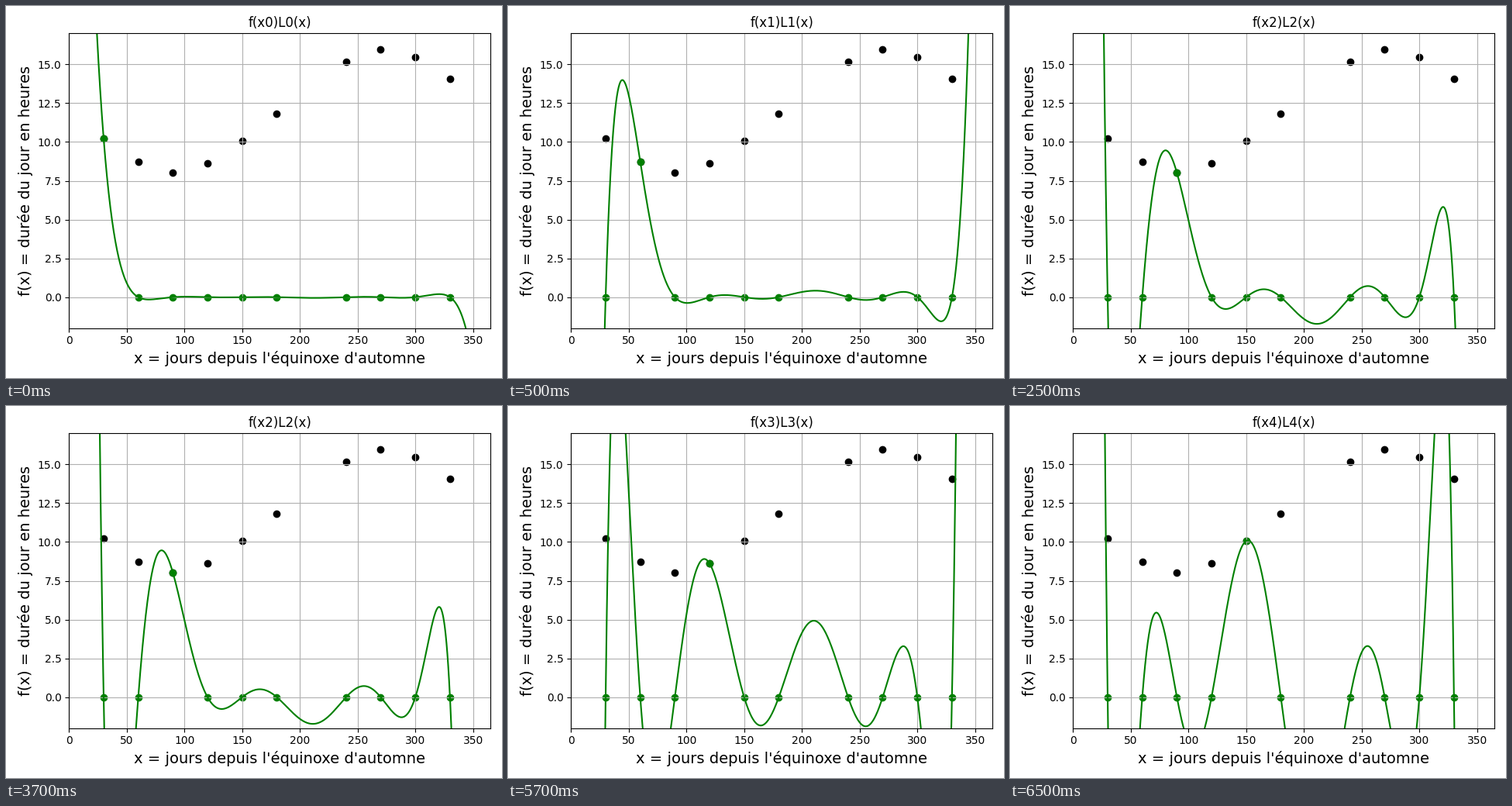
Write a matplotlib script that moves like this. It is 640 px wide and 480 px high and loops after 8000 ms.

```python
import numpy as np
import matplotlib.pyplot as plt
from matplotlib.animation import FuncAnimation

WIDTH, HEIGHT = 640, 480
STEP_MS = 500
STEPS = 16

days = np.array([30, 60, 90, 120, 150, 180, 240, 270, 300, 330])
hours = np.array([10.22, 8.73, 8.02, 8.62, 10.07, 11.82, 15.15, 15.95, 15.45, 14.07])
x = np.linspace(0, 365, 1000)


def basis(i, t):
    """Lagrange basis polynomial: 1 at node i, 0 at every other node."""
    others = np.delete(days, i)
    return np.prod((t[:, None] - others) / (days[i] - others), axis=1)


plt.rcParams["font.family"] = "DejaVu Sans"
fig, ax = plt.subplots(figsize=(WIDTH / 100, HEIGHT / 100), dpi=100)
ax.set(xlim=(0, 365), ylim=(-2, 17))
ax.set_xlabel("x = jours depuis l'équinoxe d'automne", fontsize=14)
ax.set_ylabel("f(x) = durée du jour en heures", fontsize=14)
title = ax.set_title("f(x0)L0(x)")
ax.grid(True)

ax.scatter(days, hours, color="black")
nodes = ax.scatter(days, 0 * hours, color="green")
curve, = ax.plot([], [], color="green")
fig.tight_layout()
fig.subplots_adjust(left=81.28 / WIDTH, top=444.67 / HEIGHT)


def update(step):
    # The first term is held for one step, each later one for four.
    i = (step + 3) // 4
    title.set_text(f"f(x{i})L{i}(x)")
    curve.set_data(x, hours[i] * basis(i, x))
    nodes.set_offsets(np.column_stack([days, hours * (np.arange(len(days)) == i)]))
    return title, curve, nodes


anim = FuncAnimation(fig, update, frames=STEPS, interval=STEP_MS,
                     init_func=lambda: update(0), repeat=True, repeat_delay=0)
plt.show()
```
